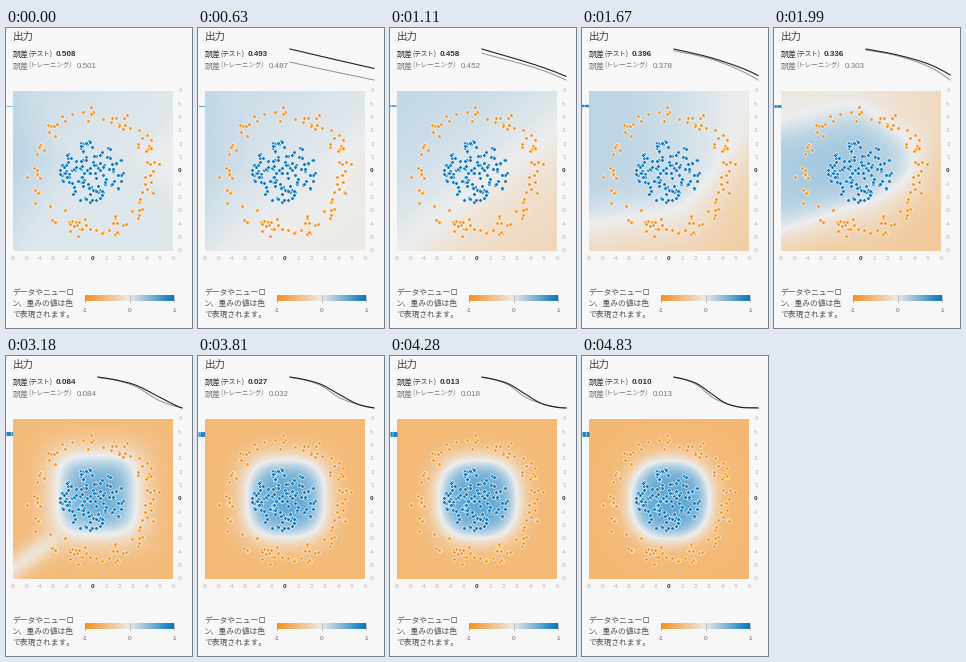
Animation of 186 by 300 pixels, one loop 4.91 s. Source, as a matplotlib script:

```python
import numpy as np
import matplotlib.pyplot as plt
from matplotlib.animation import FuncAnimation
from matplotlib.colors import LinearSegmentedColormap

W, H, DPI = 186, 300, 100
LOOP, TICK = 4910, 10
PAUSE, STEP_MS = 470, 79.2
PT = 72 / DPI  # points per pixel
ORANGE, MID, BLUE = "#f59322", "#e8eaeb", "#0877bd"
DARK, GREY = "#333333", "#777777"
LEFT, TOP, SIDE, SPAN = 7, 63, 160, 6
JP, LATIN = "Noto Sans CJK JP", "Liberation Sans"

fig = plt.figure(figsize=(W / DPI, H / DPI), dpi=DPI, facecolor="#f7f7f7")
ax = fig.add_axes([0, 0, 1, 1])


def to_px(x, y):
    scale = SIDE / (2 * SPAN)
    return LEFT + (x + SPAN) * scale, TOP + (SPAN - y) * scale


def label(x, y, text, size, color="#555555", font=JP, **kw):
    kw = {"ha": "left", "va": "center", **kw}
    return ax.text(x, y, text, fontsize=size * PT, color=color, family=font, **kw)


# --- decision surfaces -------------------------------------------------
axis = (np.arange(SIDE) + 0.5) / SIDE * 2 * SPAN - SPAN
X, Y = np.meshgrid(axis, -axis)


def relu(v):
    return np.maximum(v, 0)


def squash(z, hi, lo):
    return np.where(z > 0, hi * np.tanh(z / hi), lo * np.tanh(z / lo))


def soft_min(*planes, k):
    return -np.log(sum(np.exp(-k * p) for p in planes)) / k


def blob(cx, cy, r, power, slope, hi, lo):
    d = (np.abs(X - cx) ** power + np.abs(Y - cy) ** power) ** (1 / power)
    return squash(slope * (r - d), hi, lo)


def fan():
    return (0.09 + 0.03 * relu(-X - 1 - 0.6 * np.abs(Y - 0.5))
            + 0.012 * relu(0.8 * Y - X) - 0.03 * relu(X - 2 - np.abs(Y - 0.8)))


def diagonal():
    z = Y - 0.75 * X + 1.4
    return squash(np.where(z > 0, 0.04, 0.075) * z, 0.28, 0.38)


def corner():
    z = soft_min(0.16 * (Y - 0.15 * X + 2.9), 0.12 * (Y - 1.3 * X + 4.2),
                 0.05 * (4.5 - X), k=18)
    return squash(z + 0.02, 0.33, 0.52)


def tongue():
    z = soft_min(4.6 + 0.28 * X - Y, 4.5 - 0.65 * X - Y, 3.9 - X,
                 Y - 0.38 * X + 2.3, k=2.5)
    hi = 0.55 + 0.3 * np.clip((X + 6) / 5, 0, 1)
    return squash(0.5 * z, hi, 0.75)


def square_with_streak():
    off = (Y - 0.7 * X + 1) / 1.1
    streak = np.exp(-off ** 2) / (1 + np.exp(2 * (X + 2)))
    return blob(0.3, 0.3, 2.95, 3.6, 0.62, 0.85, 0.84 * (1 - 0.8 * streak))


KEYS = np.array([0, 9, 16, 26, 35, 43, 56])
FIELDS = [fan(), diagonal(), corner(), tongue(), square_with_streak(),
          blob(0.06, 0.03, 2.9, 2.8, 0.8, 0.88, 0.86),
          blob(0.1, -0.05, 2.93, 2.4, 0.95, 0.88, 0.87)]


def surface(step):
    i = min(np.searchsorted(KEYS, step, side="right") - 1, len(KEYS) - 2)
    w = (step - KEYS[i]) / (KEYS[i + 1] - KEYS[i])
    return (1 - w) * FIELDS[i] + w * FIELDS[i + 1]


# --- loss history ------------------------------------------------------
STEPS = np.arange(KEYS[-1] + 1)


def smooth_curve(*values):
    """Cubic Hermite curve through the key steps, one value per step."""
    k, v = KEYS, np.array(values)
    m = np.gradient(v, k)
    i = np.clip(np.searchsorted(k, STEPS, side="right") - 1, 0, len(k) - 2)
    h = k[i + 1] - k[i]
    u = (STEPS - k[i]) / h
    return ((1 + 2 * u) * (1 - u) ** 2 * v[i] + u * (1 - u) ** 2 * h * m[i]
            + u * u * (3 - 2 * u) * v[i + 1] + u * u * (u - 1) * h * m[i + 1])


TEST = smooth_curve(.508, .458, .396, .229, .084, .027, .010)
TRAIN = smooth_curve(.501, .452, .378, .182, .084, .032, .013)


def step_at(t):
    return 0 if t < PAUSE else 1 + int((t - PAUSE) / STEP_MS)


# --- static parts ------------------------------------------------------
shades = LinearSegmentedColormap.from_list("shades", [ORANGE, MID, BLUE])
heat = ax.imshow(FIELDS[0], cmap=shades, vmin=-1, vmax=1, alpha=0.7,
                 interpolation="nearest",
                 extent=(LEFT, LEFT + SIDE, TOP + SIDE, TOP))
ax.imshow(np.linspace(-1, 1, 89)[None], cmap=shades, interpolation="nearest",
          extent=(79, 168, 273, 267))

rng = np.random.default_rng(8)
for count, inner, outer, color in ((105, 3.5, 5, ORANGE), (125, 0, 2.5, BLUE)):
    r = inner + (outer - inner) * rng.uniform(0, 1, count) ** 0.6
    angle = rng.uniform(0, 2 * np.pi, count)
    ax.scatter(*to_px(r * np.cos(angle), r * np.sin(angle)),
               s=(3.6 * PT) ** 2, c=color, edgecolors="white",
               linewidths=0.6 * PT, zorder=3)

for v in range(-SPAN, SPAN + 1):
    px, py = to_px(v, v)
    style = dict(color=DARK, weight="bold") if v == 0 else dict(color="#b4b4b4")
    label(px, 231, str(v), 6.5, font=LATIN, ha="center", **style)
    label(174, py, str(v), 6.5, font=LATIN, ha="center", **style)

label(6.5, 8.5, "出力", 10.5, "#444444")
for y, name, color in ((26.5, "(テスト)", DARK), (38, "(トレーニング)", GREY)):
    label(6.5, y, "誤差", 8, color)
    label(22.5, y, name, 6.5, color)
test_text = label(50, 26.5, "", 8, DARK, LATIN, weight="bold")
train_text = label(70.5, 38, "", 8, GREY, LATIN)

for i, line in enumerate(("データやニューロ", "ン、重みの値は色", "で表現されます。")):
    label(6, 265 + 11 * i, line, 7.8)
for x, text in ((79, "-1"), (123.5, "0"), (168, "1")):
    ax.plot([x, x], [267, 274], color="#999999", lw=0.6 * PT)
    label(x, 282.5, text, 6.5, "#666666", LATIN, ha="center")

# --- moving parts ------------------------------------------------------
train_line, = ax.plot([], [], color="#8a959c", lw=1 * PT)
test_line, = ax.plot([], [], color="#1c2126", lw=1.1 * PT)
link, = ax.plot([0, 6.5], [77.7, 77.7], color=BLUE, dash_capstyle="butt")

ax.set(xlim=(0, W), ylim=(H, 0), aspect="auto")
ax.axis("off")


def update(frame):
    n = step_at(frame * TICK)
    heat.set_data(surface(n))
    test_text.set_text(f"{TEST[n]:.3f}")
    train_text.set_text(f"{TRAIN[n]:.3f}")

    # The chart rescales so the history always fills its box.
    past = slice(1, n + 1)
    x = 92 + 84 * (STEPS[past] - 1) / max(n - 1, 1)
    top, low = TEST[1], min(TEST[n], TRAIN[n])
    for line, loss in ((test_line, TEST), (train_line, TRAIN)):
        line.set_data(x, 21 + 31 * (top - loss[past]) / (top - low))
        line.set_visible(n > 1)

    # Dashes drift along the link as its weight grows.
    width = 0.8 + 4.2 * min(n / 45, 1)
    link.set_linewidth(width * PT)
    link.set_linestyle((-n / 6 / width, (4.8 / width, 0.55 / width)))
    link.set_alpha(0.6 + 0.3 * min(n / 16, 1))
    return heat, test_text, train_text, test_line, train_line, link


anim = FuncAnimation(fig, update, frames=LOOP // TICK, interval=TICK,
                     repeat=True, repeat_delay=0)
plt.show()
```
